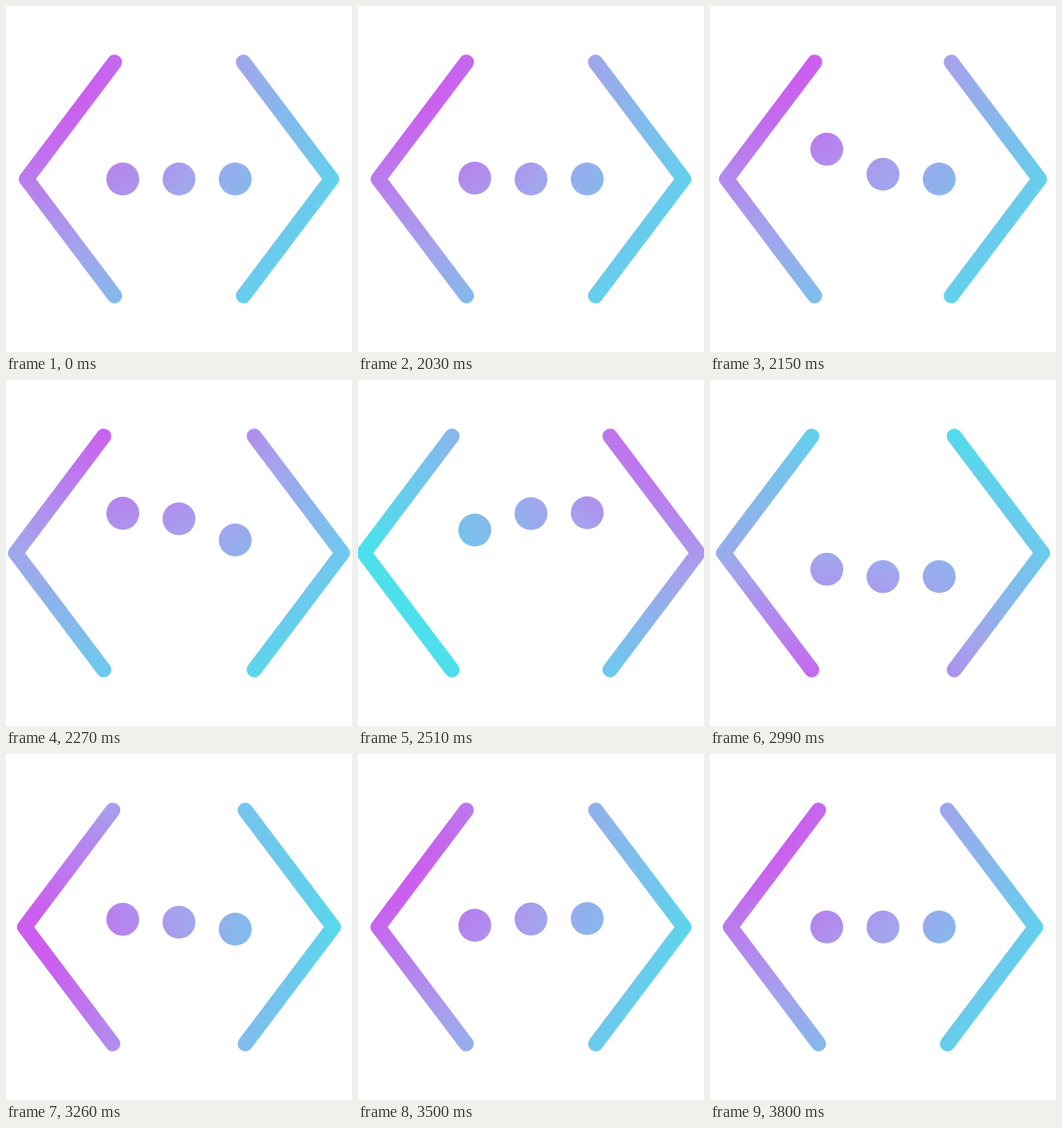
Animation of 400 by 400 pixels, one loop 3.83 s. Source, as an HTML page with a canvas:

```html
<!DOCTYPE html>
<html lang="en">
<head>
<meta charset="utf-8">
<title>Code brackets</title>
<style>
  html, body { margin: 0; width: 100%; height: 100%; overflow: hidden; background: #fff; }
  canvas { display: block; width: 400px; height: 400px; }
</style>
</head>
<body>
<canvas id="stage" width="400" height="400"></canvas>
<script>
const LOOP = 3830, HOLD = 2000, STEP = 30, STEPS = 60;
const CENTER = 200;
const ctx = document.getElementById('stage').getContext('2d');

// Cubic Bezier easing with end heights 0 and 1, solved by bisection.
function bezier(x1, x2) {
  return x => {
    if (x <= 0) return 0;
    if (x >= 1) return 1;
    let lo = 0, hi = 1;
    for (let i = 0; i < 24; i++) {
      const s = (lo + hi) / 2, r = 1 - s;
      if (3 * x1 * s * r * r + 3 * x2 * s * s * r + s ** 3 < x) lo = s;
      else hi = s;
    }
    return lo * lo * (3 - 2 * lo);
  };
}

const swift = bezier(0.4, 0.2);
const turn = bezier(0.3, 0.5);

// Tables of [progress, value].
const SPREAD = [[0, 0], [0.32, 17], [0.95, 0]];
const BOUNCE = [[0, 0], [0.176, -46.5], [0.213, -46.5], [0.48, 27.8], [0.76, -10], [0.9, 0]];

function track(keys, p) {
  if (p <= keys[0][0]) return keys[0][1];
  for (let i = 1; i < keys.length; i++) {
    const [t0, v0] = keys[i - 1], [t1, v1] = keys[i];
    if (p < t1) return v0 + (v1 - v0) * swift((p - t0) / (t1 - t0));
  }
  return keys[keys.length - 1][1];
}

// A radial gradient whose centre circles the stage, swinging wide on the right.
function paint(p) {
  const angle = Math.PI * (220 / 180 + 2 * turn(p));
  const orbit = 234 + 87 * Math.exp(-(((p - 0.38) / 0.17) ** 2));
  const x = CENTER + orbit * Math.cos(angle);
  const y = CENTER + orbit * Math.sin(angle);
  const inner = 85, middle = 240, outer = 440;
  const fill = ctx.createRadialGradient(x, y, inner, x, y, outer);
  fill.addColorStop(0, '#cb5eee');
  fill.addColorStop((middle - inner) / (outer - inner), '#a4a3ed');
  fill.addColorStop(1, '#4edfec');
  return fill;
}

function bracket(side, shift) {
  const x = d => CENTER + side * (d + shift);
  ctx.beginPath();
  ctx.moveTo(x(74.5), 65);
  ctx.lineTo(x(176.4), CENTER);
  ctx.lineTo(x(74.5), 335);
  ctx.stroke();
}

function draw(p) {
  ctx.fillStyle = '#fff';
  ctx.fillRect(0, 0, 400, 400);
  ctx.fillStyle = ctx.strokeStyle = paint(p);
  ctx.lineWidth = 17.5;
  ctx.lineCap = ctx.lineJoin = 'round';

  const shift = track(SPREAD, p);
  bracket(-1, shift);
  bracket(1, shift);

  for (let i = 0; i < 3; i++) {
    ctx.beginPath();
    ctx.arc(135 + 65 * i, CENTER + track(BOUNCE, p - 0.05 * i), 19, 0, 2 * Math.PI);
    ctx.fill();
  }
}

const start = performance.now();

function frame() {
  const t = (performance.now() - start) % LOOP;
  const step = Math.floor((t - HOLD) / STEP);
  draw(Math.min(Math.max(step / STEPS, 0), 1));
  requestAnimationFrame(frame);
}
frame();
</script>
</body>
</html>
```
